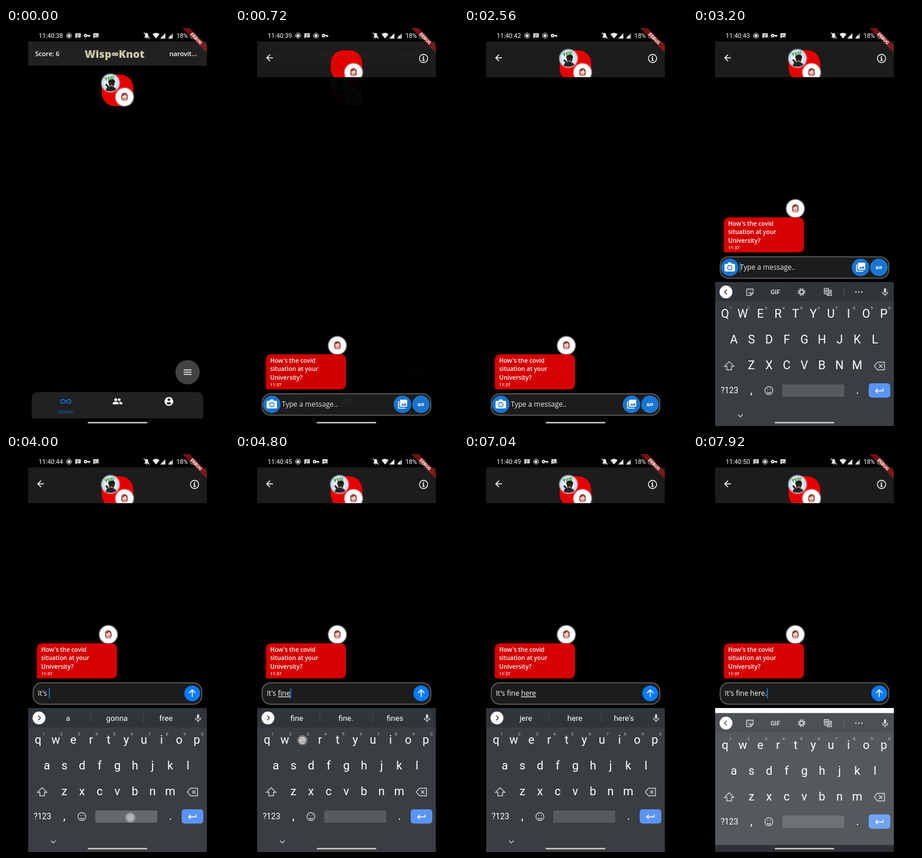
An HTML page for the animation above (8000 ms loop, 382x680 px).

```html
<!DOCTYPE html>
<html lang="en">
<head>
<meta charset="utf-8">
<title>Chat demo</title>
<style>
html, body { margin: 0; width: 100%; height: 100%; overflow: hidden; background: #000; }
svg { display: block; width: 382px; height: 680px; }
text { white-space: pre; fill: #fff; }
.app { font-family: "Open Sans", sans-serif; }
.sys { font-family: Roboto, sans-serif; }
.mid { text-anchor: middle; }
.line { fill: none; stroke: #fff; stroke-width: 1.6; }
.pale { fill: none; stroke: #c9ccd0; stroke-width: 1.4; }
.pale text { fill: #c9ccd0; }
#keys .hint { fill: #b4b7bb; font-size: 8px; }
</style>
</head>
<body>
<svg viewBox="0 0 382 680">
<defs>
  <radialGradient id="glow">
    <stop offset=".82" stop-color="#fff" stop-opacity=".7"/>
    <stop offset="1" stop-color="#fff" stop-opacity="0"/>
  </radialGradient>
  <radialGradient id="sky">
    <stop offset=".4" stop-color="#f1f7fd"/>
    <stop offset="1" stop-color="#bcd8ee"/>
  </radialGradient>
  <radialGradient id="dot">
    <stop offset=".55" stop-color="#ccc" stop-opacity=".75"/>
    <stop offset="1" stop-color="#ccc" stop-opacity=".25"/>
  </radialGradient>
  <clipPath id="phone"><path d="M38 0h306v680H38z"/></clipPath>
  <clipPath id="header"><path d="M38 23h306v61H38z"/></clipPath>
  <g id="girl">
    <circle r="17.500" fill="url(#glow)"/><circle r="15" fill="#fff"/>
    <path d="M-5.500 4V-2a5.500 5.500 0 0 1 11 0V4z" fill="#8f453f"/>
    <ellipse cy="-.5" rx="3.800" ry="4.300" fill="#f6d0c2"/>
    <path d="M-4-2q4 0 5-3 1 2 3 3v-3q-4-3-8 0z" fill="#8f453f"/>
    <path d="M-1.200 1.800h2.400" stroke="#c33" stroke-width=".8"/>
    <path d="M-5 6.500q0-3 5-3t5 3z" fill="#e5868e"/>
  </g>
  <g id="guy">
    <circle r="17.500" fill="url(#glow)"/><circle r="15" fill="url(#sky)"/>
    <path d="M-8 13q0-7 8-7 8 0 10 5-6 5-18 2z" fill="#20252a"/>
    <path d="M-5 8l-4-5 2-2 5 5z" fill="#33231e"/>
    <ellipse cx="2" cy="1" rx="5" ry="6" fill="#33231e"/>
    <path d="M-4 0q0-7 6-7t6 7q-6-4-12 0z" fill="#151515"/>
    <path d="M0 4.500h4" stroke="#eee"/>
    <text class="app mid" y="-5" font-size="8" font-weight="800" transform="rotate(-12)" style="fill:#3f8f2c">YES!</text>
  </g>
  <rect id="blob" x="-27" y="-27" width="54" height="54" rx="22.500"/>
  <g id="rec"><circle r="4.300" fill="none" stroke="#eee"/><circle r="2.600" fill="#eee"/></g>
  <g id="msg"><path d="M-4.500-4h9v7h-7l-2 2z" fill="#eee"/><path d="M-2.500-2h5m-5 2h5m-5 2h3" stroke="#111" stroke-width=".8"/></g>
  <g id="key" fill="none" stroke="#eee" stroke-width="2"><circle cx="-2.500" r="2"/><path d="M0 0h5.500M3.500 0v2.500"/></g>
  <g id="mute"><path d="M-4.500-4h9v7h-7l-2 2z" fill="#eee"/><path d="M-2.500-1h4m-4 2h2M0 4l5-5" stroke="#111"/></g>
</defs>

<g clip-path="url(#phone)">
<g id="home">
  <path d="M38 23h306v41.500H38z" fill="#212121"/>
  <g class="app" font-size="11.100" font-weight="600">
    <text x="50" y="48">Score: 6</text>
    <text x="280" y="48">narovit...</text>
    <text class="mid" x="186" y="51" font-size="18" font-weight="800" style="fill:#cdc9a5">Wisp∞Knot</text>
  </g>
  <g transform="translate(191 106.500)">
    <use href="#blob" fill="#e60000"/>
    <use href="#guy" x="-12" y="-12.500"/><use href="#girl" x="12" y="11.500"/>
  </g>
  <circle cx="311" cy="588" r="20.800" fill="#424242"/>
  <path class="line" d="M304.300 584.300h13.400m-13.400 3.700h13.400m-13.400 3.700h13.400"/>
  <path d="M44 667V634q0-12 12-12h270q12 0 12 12v33z" fill="#212121"/>
  <path d="M102.500 638c-2.200-2.400-3.600-3.200-5.400-3.200a3.200 3.200 0 0 0 0 6.400c1.800 0 3.200-.8 5.400-3.200s3.600-3.200 5.400-3.200a3.200 3.200 0 0 1 0 6.400c-1.800 0-3.200-.8-5.400-3.200z" fill="none" stroke="#0d6fd6" stroke-width="1.700"/>
  <text class="app mid" x="102" y="659" font-size="8.800" style="fill:#0d6fd6">Home</text>
  <g fill="#fff">
    <circle cx="188" cy="635" r="2.500"/><circle cx="194" cy="635" r="2.300"/>
    <path d="M182.800 643v-1.500q0-3 5.200-3t5.200 3v1.500zM194.700 643v-1.500q0-2-1.400-2.900 6-.4 6 2.900v1.500z"/>
    <circle cx="279" cy="638" r="7.500"/>
  </g>
  <g fill="#212121"><circle cx="279" cy="635" r="2.300"/><path d="M274.500 641q4.500-3.500 9 0-4.500 4.500-9 0z"/></g>
</g>

<g id="chat">
  <path d="M38 23h306v657H38z"/>
  <path d="M38 23h306v61H38z" fill="#1c1c1c"/>
  <g clip-path="url(#header)"><g transform="translate(191 65)">
    <use href="#blob" fill="#e60000"/>
    <use id="guyTop" href="#guy" x="-12" y="-13"/><use href="#girl" x="12" y="11"/>
  </g></g>
  <path class="line" d="M65 51H54.500m5.500-5.500-5.500 5.500 5.500 5.500"/>
  <circle class="line" cx="323" cy="52" r="7" style="stroke-width:1.400"/>
  <path class="line" d="M321 51h2v4.500m-2 0h4M322 48.500h2"/>
  <g id="lift" class="app">
    <use href="#girl" x="175.300" y="542.500"/>
    <path d="M62.700 557.500h117.500q10 0 10 10v40q0 10-10 10H56q-3.300 0-3.300-3.300v-46.700q0-10 10-10z" fill="#d60000"/>
    <g font-size="10.300" font-weight="600">
      <text x="60.300" y="572.300">How's the covid</text>
      <text x="60.300" y="586.400">situation at your</text>
      <text x="60.300" y="600.500">University?</text>
      <text x="60.300" y="611.500" font-size="7.500">11:37</text>
    </g>
    <rect x="46.500" y="625" width="289" height="36.500" rx="14.500" fill="#1c1c1c" stroke="#6a6a6a" stroke-width="1.500"/>
    <g id="empty">
      <g fill="#1976d2"><circle cx="63" cy="643" r="15"/><circle cx="287" cy="643" r="15"/><circle cx="318.500" cy="643" r="15"/></g>
      <path d="M54 639q0-2 2-2h3l2-2.500h4l2 2.500h3q2 0 2 2v9q0 2-2 2H56q-2 0-2-2z" fill="#fff"/>
      <circle cx="63" cy="643.500" r="3.700" fill="#fff" stroke="#1976d2" stroke-width="1.500"/>
      <rect x="282.500" y="635" width="12.500" height="12" rx="1.500" fill="#fff"/>
      <path d="M284.500 645l2.500-3.500 2 2.500 2.500-3.500 2.500 4.500z" fill="#1976d2"/>
      <path class="line" d="M280.300 638v11.500H292"/>
      <text class="mid" x="318.500" y="645.500" font-size="7" font-weight="800">GIF</text>
      <text x="80.300" y="647.300" font-size="12" style="fill:#eee">Type a message..</text>
    </g>
    <g id="filled">
      <text y="647.300" x="54.500" font-size="12"><tspan id="plain"></tspan><tspan id="composing" text-decoration="underline"></tspan></text>
      <circle cx="319" cy="643" r="13.500" fill="#087bff"/>
      <path class="line" d="M319 649v-12m-5.500 5.500 5.500-5.500 5.500 5.500"/>
    </g>
    <rect id="cursor" y="634.500" width="1.600" height="17" fill="#1684f0"/>
  </g>
  <path id="backdrop" d="M38 434h306v246H38z" fill="#fff"/>
  <g id="board" class="sys">
    <path d="M38 434h306v256H38z" fill="#3a3e42"/>
    <path d="M38 434h306v33H38z" fill="#30353a"/>
    <circle cx="56.500" cy="451" r="11" fill="#fff"/>
    <path id="arrow" fill="none" stroke="#333" stroke-width="1.500"/>
    <g class="pale">
      <rect x="327" y="444.500" width="4" height="8" rx="2" fill="#c9ccd0" stroke="none"/>
      <path d="M324.500 450.500q0 4.500 4.500 4.500t4.500-4.500M329 455v3.500"/>
    </g>
    <g id="words" class="mid" font-size="13.300">
      <path id="choice" d="M146 434h90v33h-90z" fill="#454a50"/>
      <path d="M145.500 443v16m90-16v16" stroke="#4a4e53"/>
      <text x="106" y="456"></text><text x="190" y="456"></text><text x="274" y="456"></text>
    </g>
    <g id="tools" class="pale">
      <path d="M92 446h11v7l-4 4h-7zM99 457v-4h4M95 449h1m3 0h1M95 452q2 2 4 0"/>
      <text class="mid" x="141" y="455" font-size="11" font-weight="700" stroke="none">GIF</text>
      <circle cx="186" cy="451" r="3.300" stroke-width="2"/>
      <circle cx="186" cy="451" r="5.500" stroke-width="2" stroke-dasharray="2.600 1.720"/>
      <path d="M225 445h7v9h-7zM232 448h5v9h-7l-1-3M233 451h3m-1 0q0 3-3 4"/>
      <circle cx="228.500" cy="449.500" r="1.700"/>
      <path d="M258.500 445v13" stroke="#5a5e63" stroke-width="1"/>
      <path d="M279 451h.1m5 0h.1m5 0h.1" stroke-width="2.600" stroke-linecap="round"/>
    </g>
    <g id="keys" class="mid" font-size="20"></g>
    <g class="pale">
      <path d="M62 570l8 8h-4v6h-8v-6h-4zM316 571h12v13h-12l-5.500-6.500zM318.500 574.500l6 6m0-6-6 6"/>
      <circle cx="130" cy="619.500" r="6.800"/>
      <path d="M127 617.500h1.500m3 0h1.500M126.500 621.500q3.500 4 7 0"/>
    </g>
    <rect id="space" x="153" y="609" width="106" height="21" rx="1.500"/>
    <rect x="301" y="607" width="37" height="24.500" rx="5" fill="#5a94f4"/>
    <path class="line" d="M325.500 616v4H313m3.500-3.500-3.500 3.500 3.500 3.500"/>
    <path id="fold" class="pale" d="M77 660.500l4 4 4-4"/>
  </g>
  <path id="navbar" d="M38 668h306v12H38z" fill="#2d3035"/>
</g>

<g class="sys" font-size="10.800">
  <text id="clock" x="56" y="17"></text>
  <g id="notices"></g>
  <g fill="#eee">
    <path d="M236.500 16.500q2-1 2-4 0-4 2.500-4t2.500 4q0 3 2 4zM240 17.500h2l-1 1.500z"/>
    <path d="M251 10.500q6-4.500 12 0l-6 7.500zM264 18l9-9v9z"/>
    <path d="M277 18l9-9v9z" fill="#aaa"/>
  </g>
  <path d="M236 8l10 10" stroke="#eee" stroke-width="1.200"/>
  <path d="M280 18v-3l3-3v6z" fill="#fff"/>
  <text x="292" y="17" font-size="10.500">18%</text>
  <circle cx="320" cy="13" r="4.500" fill="none" stroke="#888" stroke-width="1.500"/>
</g>
<g transform="translate(326.100 17.900) rotate(45)">
  <path d="M-30-4.500h60v9h-60z" fill="#b71c1c" fill-opacity=".63"/>
  <text class="sys mid" y="2.700" font-size="7.600" font-weight="900">DEBUG</text>
</g>
<rect x="140" y="673" width="102" height="2.400" rx="1.200" fill="#c8c8c8"/>
<circle id="touch" r="9" fill="url(#dot)"/>
</g>
</svg>

<script>
const LOOP = 8000, LIFT = 234, STEP = 30.2;
const $ = id => document.getElementById(id);
const clamp = x => Math.max(0, Math.min(1, x));
const easeOut = x => 1 - (1 - clamp(x)) ** 2;
const show = (id, on) => $(id).setAttribute('display', on ? 'inline' : 'none');
const shift = (id, y) => $(id).setAttribute('transform', `translate(0 ${y})`);

// Keyboard letters
const spots = { ' ': [213, 621], '.': [282, 620], '<': [319, 577], here: [218, 449] };
const letters = [];
const addKey = (label, x, y, cls = '') => {
  const el = document.createElementNS('http://www.w3.org/2000/svg', 'text');
  el.setAttribute('x', x);
  el.setAttribute('y', y);
  if (cls) el.setAttribute('class', cls);
  el.textContent = label;
  $('keys').append(el);
  return el;
};
[['qwertyuiop', 55, 495], ['asdfghjkl', 70, 539], ['zxcvbnm', 100, 583]].forEach(([row, x0, y], r) =>
  [...row].forEach((c, i) => {
    const x = x0 + STEP * i;
    spots[c] = [x, y - 6];
    letters.push([addKey(c, x, y), c]);
    if (!r) addKey((i + 1) % 10, x + 9.5, 480.5, 'hint');
  }));
addKey(',', 100, 625);
addKey('.', 282, 625);
addKey('?123', 62.5, 624).setAttribute('font-size', 14);

// time, key, settled text, composing word, suggestions
const edits = [
  [3360, 'i', '', 'I', 'I|I\'m|I\'ll'],
  [3520, 't', '', 'It', 'it|It|It\'s'],
  [3700, 's', '', 'Its', 'its|It\'s|itself'],
  [3960, ' ', 'It\'s ', '', 'a|gonna|free'],
  [4300, 'f', 'It\'s ', 'f', 'for|f|from'],
  [4480, 'i', 'It\'s ', 'fi', 'first|fi|fine'],
  [4640, 'n', 'It\'s ', 'fin', 'fin|fine|find'],
  [4780, 'e', 'It\'s ', 'fine', 'fine|fine.|fines'],
  [4920, ' ', 'It\'s fine ', '', 'and|but|I'],
  [5040, 'j', 'It\'s fine ', 'j', 'just|j|job'],
  [5120, 'e', 'It\'s fine ', 'je', 'he|je|her'],
  [5200, 'r', 'It\'s fine ', 'jer', 'jer|her|jerk'],
  [5280, 'e', 'It\'s fine ', 'jere', 'jere|here|here\'s'],
  [5725, 'here', 'It\'s fine here ', '', 'and|in|is'],
  [6600, '<', 'It\'s fine ', 'here', 'jere|here|here\'s'],
  [7640, '.', 'It\'s fine here.', '', '']
];
const taps = [[200, [185, 108]], [2860, [180, 643]],
  ...edits.map(([time, key]) => [time, spots[key]])];

const wordEls = $('words').querySelectorAll('text');

function drawText(t) {
  const edit = edits.filter(e => e[0] <= t).pop();
  const [since, , plain, composing, hints] = edit || [3000, '', '', '', ''];
  show('empty', !edit);
  show('filled', edit);
  $('plain').textContent = plain;
  $('composing').textContent = composing;
  const width = edit ? $('plain').parentNode.getComputedTextLength() : 0;
  $('cursor').setAttribute('x', edit ? 54.5 + width : 80);
  show('cursor', t >= 3000 && (t - since) % 667 < 333);
  show('words', hints);
  show('tools', !hints);
  hints.split('|').forEach((w, i) => wordEls[i].textContent = w);
  const picking = t >= 5280 && t < 5725;
  wordEls[1].setAttribute('font-weight', picking ? 700 : 400);
  show('choice', t >= 5600 && t < 5725);
  $('arrow').setAttribute('d', hints ? 'M55 447l4 4-4 4' : 'M58 447l-4 4 4 4');
  letters.forEach(([el, c]) => el.textContent = edit ? c : c.toUpperCase());
}

function drawStatus(t) {
  $('clock').textContent = '11:40:' + Math.floor(38.6 + t * 0.0015);
  const order = t < 640 ? 'rec msg key mute' : t < 3000 ? 'rec msg rec key'
    : t < 6400 ? 'rec msg key mute' : 'msg rec key mute';
  if ($('notices').dataset.order === order) return;
  $('notices').dataset.order = order;
  $('notices').innerHTML = order.split(' ')
    .map((n, i) => `<use href="#${n}" x="${108 + 15.4 * i}" y="13"/>`).join('');
}

function draw(t) {
  drawStatus(t);
  drawText(t);
  const entered = easeOut((t - 320) / 480);
  $('chat').setAttribute('opacity', entered);
  show('home', entered < 1);
  show('guyTop', t >= 1000);

  const raised = easeOut((t - 3000) / 200);
  const closing = clamp((t - 7840) / 80);
  shift('lift', -LIFT * raised);
  shift('board', 246 * (1 - raised) + 8.7 * closing);
  show('board', raised > 0);
  $('board').setAttribute('opacity', 1 - 0.14 * closing);
  show('backdrop', closing > 0);
  show('navbar', closing > 0);
  show('fold', closing === 0);

  const tap = taps.find(([time]) => t >= time - 60 - 60 * (time === 5725) && t < time + 60);
  show('touch', tap);
  if (tap) $('touch').setAttribute('transform', `translate(${tap[1]})`);
  $('space').setAttribute('fill', tap && tap[1] === spots[' '] ? '#66696c' : '#585b5e');
}

const start = performance.now();
function tick(now) {
  draw(Math.max(0, now - start) % LOOP);
  requestAnimationFrame(tick);
}
draw(0);
requestAnimationFrame(tick);
</script>
</body>
</html>
```
